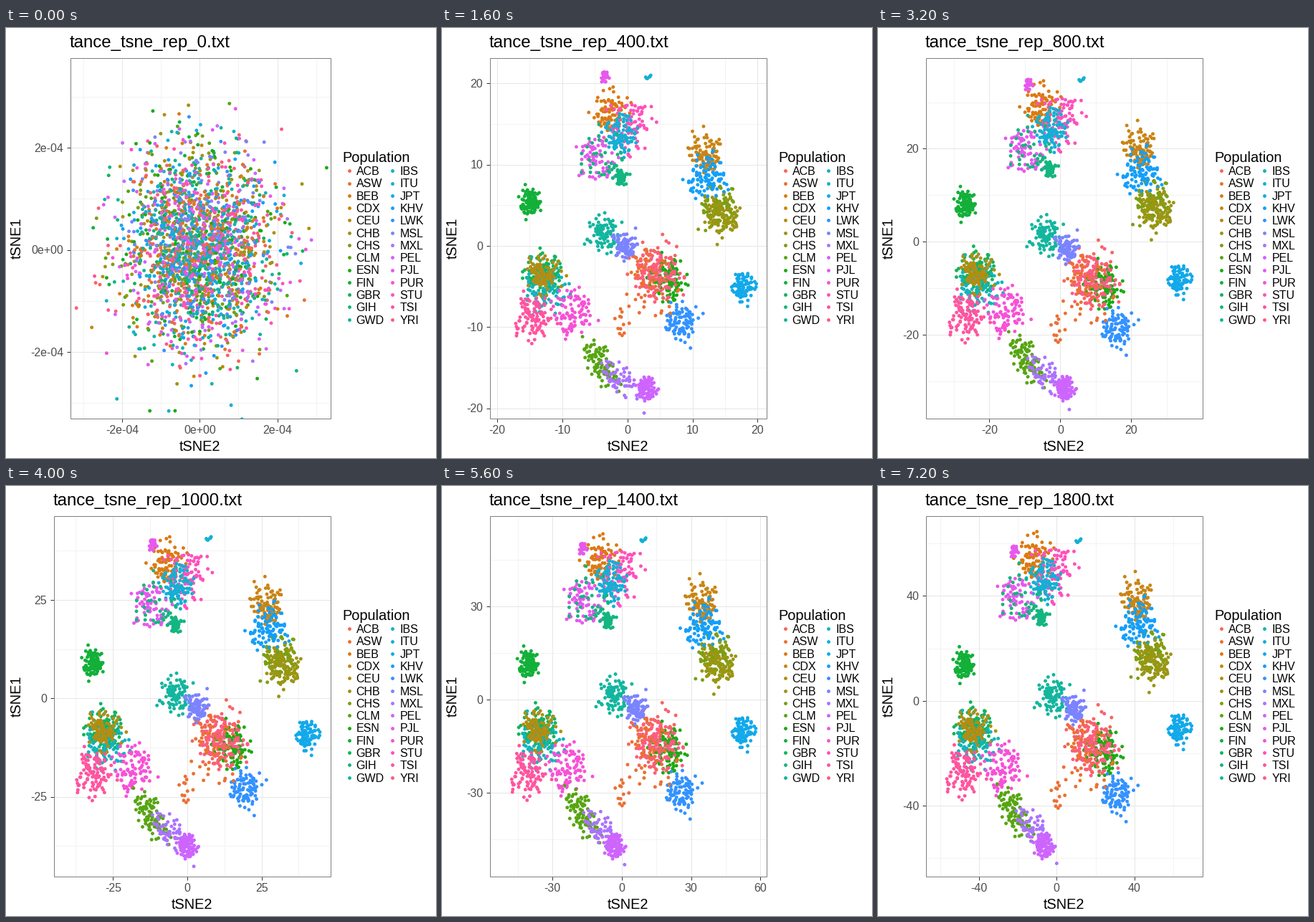
A matplotlib script that plays this animation: 600 by 600 pixels, repeating every 8000 ms.

```python
import math

import matplotlib.pyplot as plt
import numpy as np
from matplotlib.animation import FuncAnimation
from matplotlib.patches import Rectangle

SIZE, DPI = 600, 100
PX = 72 / DPI                      # points per pixel
TOP, BOTTOM, RIGHT = 41.5, 544.5, 452.5
DOT = (4.9 * PX) ** 2
STEPS = [2, 5, 10, 10, 20, 25, 25, 30, 30, 40]
plt.rcParams["font.family"] = "Liberation Sans"
plt.rcParams["axes.unicode_minus"] = False

POPS = ("ACB ASW BEB CDX CEU CHB CHS CLM ESN FIN GBR GIH GWD "
        "IBS ITU JPT KHV LWK MSL MXL PEL PJL PUR STU TSI YRI").split()

rng = np.random.default_rng(11)


def hue(i):
    """Evenly spaced hues at luminance 65 and chroma 100 (polar LUV)."""
    h = math.radians(15 + 360 * i / len(POPS))
    lum, chroma = 65, 100
    y = ((lum + 16) / 116) ** 3
    u = chroma * math.cos(h) / (13 * lum) + 0.1978
    v = chroma * math.sin(h) / (13 * lum) + 0.4683
    x = 9 * y * u / (4 * v)
    z = -x / 3 - 5 * y + 3 * y / v
    rgb = np.array([3.2405 * x - 1.5371 * y - 0.4985 * z,
                    -0.9693 * x + 1.8760 * y + 0.0416 * z,
                    0.0556 * x - 0.2040 * y + 1.0572 * z])
    rgb = np.clip(rgb, 0, 1)
    srgb = np.where(rgb > 0.0031308, 1.055 * rgb ** (1 / 2.4) - 0.055, 12.92 * rgb)
    return tuple(np.clip(srgb ** 1.2, 0.07, 1))


PALETTE = {p: hue(i) for i, p in enumerate(POPS)}
colors, clouds = [], []


def group(before, drift, *clusters, tilt=0):
    """Clusters (name, x, y, spread, dots) sharing one offset before and one drift after."""
    for pop, x, y, spread, *rest in clusters:
        n = rest[0] if rest else 96
        r = 2 * rng.random(n) ** 0.6 * np.exp(0.2 * rng.normal(size=n))
        a = rng.random(n) * 2 * np.pi
        dx, dy = r * np.cos(a), r * np.sin(a)
        dy = tilt * dx + math.sqrt(1 - tilt * tilt) * dy
        cloud = np.column_stack([dx, 1.2 * dy]) * spread
        mid = np.array([x, y])
        clouds.append((mid + before + 0.82 * cloud, mid + cloud,
                       mid + drift + cloud * (0.95, 1.05)))
        colors.extend([PALETTE[pop]] * n)


# islands that travel together, back to front
group((0, 16), (-8, -4), ("GBR", 142, 340, 13), ("IBS", 142, 368, 15),
      ("CEU", 143, 343, 11), ("TSI", 127, 405, 13), ("PUR", 181, 396, 14))
group((-1, 18), (-3, 7), ("FIN", 122, 244, 7.5))
group((16, 14), (-31, -13), ("CLM", 221, 469, 13), ("MXL", 248, 491, 14, 60), tilt=0.6)
group((31, 5), (-54, -1), ("PEL", 286, 503, 6.5))
group((11, 17), (-6, -16), ("CHS", 386, 248, 13), ("CDX", 366, 177, 11),
      ("KHV", 370, 207, 13), ("CHB", 391, 261, 12))
group((9, 12), (0, -22), ("JPT", 420, 362, 8))
group((2, 14), (0, 20), ("ACB", 296, 343, 17), ("ESN", 317, 351, 13),
      ("YRI", 301, 346, 14), ("LWK", 335, 410, 11), ("ASW", 285, 356, 20, 50),
      ("ASW", 251, 420, 6, 10))
group((-4, 14), (18, 7), ("GWD", 225, 288, 10), ("MSL", 256, 305, 7.5))
group((10, 33), (-17, -17), ("BEB", 238, 117, 12), ("STU", 262, 138, 15),
      ("ITU", 249, 148, 11))
group((12, 31), (-22, -25), ("PJL", 214, 183, 14, 72), ("GIH", 224, 178, 16, 36),
      ("GIH", 250, 208, 5, 60))
group((32, 33), (-37, 23), ("PJL", 227, 69, 3.5, 24))
group((-21, -3), (-8, 8), ("ITU", 288, 68, 2, 6))

EARLY, MID, LATE = (np.vstack(part) for part in zip(*clouds))
START = rng.normal((270, 309), (51, 70), size=EARLY.shape)


def progress(i):
    """Logarithmic time from the third step to the last."""
    return math.log(i / 2) / math.log(4.5)


def positions(i):
    if i < 2:
        return (START, EARLY)[i]
    return MID + (LATE - MID) * progress(i)


def view(i):
    """Panel left edge, then origin and pixels per unit for x and y."""
    if i == 0:
        return 89.5, 270.3, 54.1, 309.5, 71.3
    if i == 1:
        return 61.5, 265.5, 22.8, 321.5, 25.07
    s = progress(i)
    return (66.5, 258.6 - 9.3 * s, 9.09 * math.exp(0.2 * s * s - 1.41 * s),
            np.interp(s, [0, 0.61, 1], [304, 296.3, 299.8]),
            11.33 * math.exp(0.15 * s * s - 1.28 * s))


fig = plt.figure(figsize=(SIZE / DPI, SIZE / DPI), dpi=DPI, facecolor="white")
ax = fig.add_axes([0, 0, 1, 1])
ax.set_xlim(0, SIZE)
ax.set_ylim(SIZE, 0)
ax.axis("off")


def text(x, y, s, size, color="black", **kw):
    kw.setdefault("va", "baseline")
    return ax.text(x, y, s, fontsize=size * PX, color=color, **kw)


def line(xs, ys, color, width, z):
    return ax.plot(xs, ys, color=color, lw=width * PX, zorder=z,
                   solid_capstyle="butt")[0]


# legend and fixed labels
text(469.5, 187, "Population", 20)
for k, pop in enumerate(POPS):
    col, row = divmod(k, 13)
    y = 199.3 + 17.28 * row
    ax.scatter([478.5 + 60 * col], [y], s=DOT, color=[PALETTE[pop]], linewidths=0)
    text(488.5 + 61 * col, y + 5.9, pop, 16)

title = text(0, 27.5, "", 24)
x_name = text(0, 590, "tSNE2", 20, ha="center")
text(24.5, 293, "tSNE1", 20, rotation=90, ha="right", va="center")
frame = Rectangle((0, TOP), 1, BOTTOM - TOP, fill=False, ec="#7f7f7f",
                  lw=PX, zorder=5)
ax.add_patch(frame)
dots = ax.scatter(START[:, 0], START[:, 1], s=DOT, c=colors, linewidths=0, zorder=3)
dots.set_clip_path(frame)
temp = []


def label(value, i):
    if i:
        return str(value)
    return "0e+00" if value == 0 else f"{value}e-04"


def update(i):
    while temp:
        temp.pop().remove()
    left, x0, ux, y0, uy = view(i)
    step = STEPS[i]
    title.set_text(f"tance_tsne_rep_{200 * i}.txt")
    title.set_x(left - 0.5)
    x_name.set_x((left + RIGHT) / 2)
    frame.set_x(left)
    frame.set_width(RIGHT - left)

    # half steps: even ones are labelled, odd ones are faint
    for k in range(-8, 9):
        major = k % 2 == 0
        color, width, z = ("#e6e6e6", 1, 2) if major else ("#f0f0f0", 0.8, 1)
        x = x0 + k * step / 2 * ux
        y = y0 - k * step / 2 * uy
        name = label(k // 2 * step, i)
        if left < x < RIGHT - 1.5:
            temp.append(line([x, x], [TOP, BOTTOM], color, width, z))
            if major:
                temp.append(line([x, x], [BOTTOM, BOTTOM + 5], "#333333", 1, 2))
                temp.append(text(x, 566.3, name, 16, "#4d4d4d", ha="center"))
        if TOP < y < BOTTOM:
            temp.append(line([left, RIGHT], [y, y], color, width, z))
            if major:
                temp.append(line([left - 5, left], [y, y], "#333333", 1, 2))
                temp.append(text(left - 9.3, y + 5.8, name, 16, "#4d4d4d", ha="right"))

    dots.set_offsets(positions(i))
    dots.set_clip_path(frame)
    return [dots]


anim = FuncAnimation(fig, update, frames=len(STEPS), interval=800,
                     repeat=True, repeat_delay=0, blit=False)
plt.show()
```
